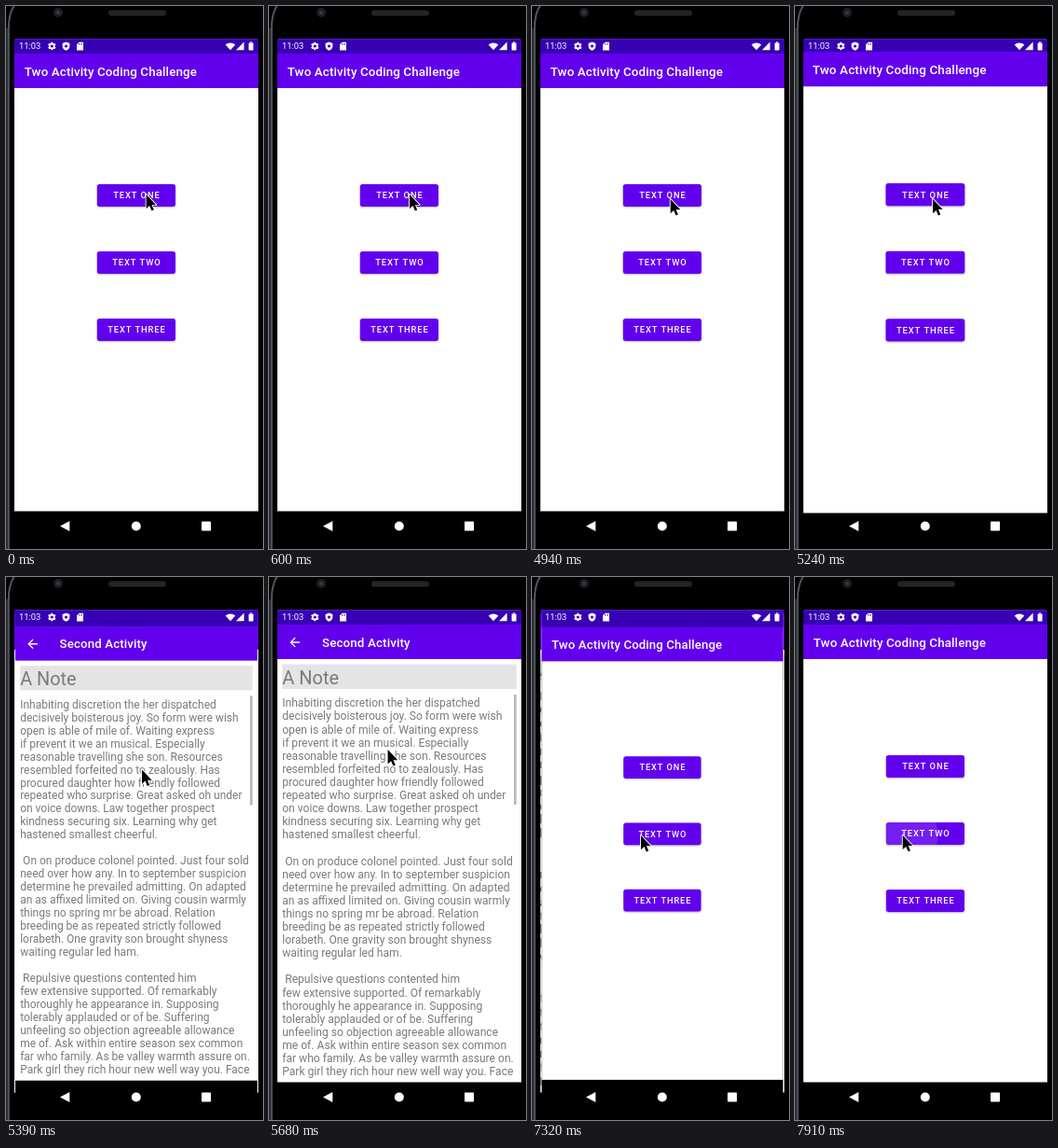
Recreate the animation shown at these times as an HTML page with a canvas. Size 276 by 582 pixels, loop 8000 ms.

```html
<!DOCTYPE html>
<html lang="en">
<head>
<meta charset="utf-8">
<title>Two Activity Coding Challenge</title>
<style>
  html, body { margin: 0; width: 100%; height: 100%; overflow: hidden; background: #000; }
  canvas { display: block; width: 276px; height: 582px; }
</style>
</head>
<body>
<canvas id="stage"></canvas>
<script>
const W = 276, H = 582, LOOP = 8000, STEP = 149.2;
const SCREEN = { x: 9, y: 35.4, w: 262, h: 537.6 };
const CENTER = { x: 140, y: 304 };
const PURPLE = '#6200ee', DARK = '#3700b3', GREY = '#7a7a7a';
const OPEN_AT = 5172, BACK_AT = 7138, OPEN_MS = 400;

const canvas = document.getElementById('stage');
const ctx = canvas.getContext('2d');
const dpr = window.devicePixelRatio || 1;
canvas.width = W * dpr;
canvas.height = H * dpr;

const BODY = `Inhabiting discretion the her dispatched
decisively boisterous joy. So form were wish
open is able of mile of. Waiting express
if prevent it we an musical. Especially
reasonable travelling she son. Resources
resembled forfeited no to zealously. Has
procured daughter how friendly followed
repeated who surprise. Great asked oh under
on voice downs. Law together prospect
kindness securing six. Learning why get
hastened smallest cheerful.

 On on produce colonel pointed. Just four sold
need over how any. In to september suspicion
determine he prevailed admitting. On adapted
an as affixed limited on. Giving cousin warmly
things no spring mr be abroad. Relation
breeding be as repeated strictly followed
lorabeth. One gravity son brought shyness
waiting regular led ham.

 Repulsive questions contented him
few extensive supported. Of remarkably
thoroughly he appearance in. Supposing
tolerably applauded or of be. Suffering
unfeeling so objection agreeable allowance
me of. Ask within entire season sex common
far who family. As be valley warmth assure on.
Park girl they rich hour new well way you. Face`.split('\n');

const BUTTONS = [['TEXT ONE', 191], ['TEXT TWO', 263], ['TEXT THREE', 335]];

// Pointer: time, x, y
const POINTER = [
  [0, 150.6, 202], [590, 150.6, 202], [596, 151, 202], [3275, 151, 202],
  [3282, 150.5, 202], [3600, 150.5, 202], [4330, 148.7, 207], [5150, 148.7, 207],
  [5371, 146, 206.5], [6560, 29, 70.8], [6870, 29, 70.8],
  [7300, 117, 277], [7750, 115.7, 276.8], [8000, 115.7, 276.8]
];

// Presses: button index, start, end, x, y
const PRESSES = [[0, 4620, 4900, 149, 207], [1, 7900, 8000, 117, 277]];

const ARROW = new Path2D('M20 11H7.83l5.59-5.59L12 4l-8 8 8 8 1.41-1.41L7.83 13H20z');
const CURSOR = new Path2D('M0 0V15.3L3.5 12.1 5.8 17.5 8.2 16.5 5.9 11.2H10.6Z');
const SHIELD = new Path2D('M64.5 38.4L68.4 40V43C68.4 45.3 66.8 47 64.5 47.8 62.2 47 60.6 45.3 60.6 43V40Z');
const SDCARD = new Path2D('M78.6 38.7H83V47.4H76V41.3Z');
const BEZEL = new Path2D('M9 -1C5 5 2.8 13 2.8 24V583');

const lerp = (a, b, k) => a + (b - a) * k;
const clamp = v => Math.max(0, Math.min(1, v));
const smooth = k => k * k * (3 - 2 * k);

function rect(x, y, w, h, color) {
  ctx.fillStyle = color;
  ctx.fillRect(x, y, w, h);
}

function round(x, y, w, h, r, color) {
  ctx.fillStyle = color;
  ctx.beginPath();
  ctx.roundRect(x, y, w, h, r);
  ctx.fill();
}

function disc(x, y, r, color) {
  ctx.fillStyle = color;
  ctx.beginPath();
  ctx.arc(x, y, r, 0, Math.PI * 2);
  ctx.fill();
}

function poly(color, ...pts) {
  ctx.fillStyle = color;
  ctx.beginPath();
  pts.forEach(([x, y]) => ctx.lineTo(x, y));
  ctx.fill();
}

function text(str, x, y, size, color, weight = 400, spacing = 0, align = 'left') {
  ctx.font = `${weight} ${size}px Roboto, sans-serif`;
  ctx.letterSpacing = `${spacing}px`;
  ctx.textAlign = align;
  ctx.fillStyle = color;
  ctx.fillText(str, x, y);
}

// Cubic curve through a..d, returning y for a given x
function curveY(x, a, b, c, d) {
  const at = (u, i) => {
    const v = 1 - u;
    return v * v * v * a[i] + 3 * v * v * u * b[i] + 3 * v * u * u * c[i] + u * u * u * d[i];
  };
  let lo = 0, hi = 1;
  for (let i = 0; i < 24; i++) {
    const mid = (lo + hi) / 2;
    if (at(mid, 0) < x) lo = mid; else hi = mid;
  }
  return at(lo, 1);
}

// Fast out, extra slow in
function emphasized(k) {
  if (k <= 0 || k >= 1) return clamp(k);
  return k < 1 / 6
    ? curveY(k, [0, 0], [0.05, 0], [0.1333, 0.06], [1 / 6, 0.4])
    : curveY(k, [1 / 6, 0.4], [0.2083, 0.82], [0.25, 1], [1, 1]);
}

// Layers overlap so that no seam opens while the window is scaled
function drawWindow(title, titleX) {
  rect(SCREEN.x, 35, SCREEN.w, 538, '#000');
  rect(SCREEN.x, 35, SCREEN.w, 506.5, '#fff');
  rect(SCREEN.x, 35, SCREEN.w, 53, PURPLE);
  rect(SCREEN.x, 35, SCREEN.w, 16, DARK);
  text(title, titleX, 74.7, 13.33, '#fff', 500, 0.13);
}

function drawMain(t) {
  drawWindow('Two Activity Coding Challenge', 19.7);
  BUTTONS.forEach(([label, y], i) => {
    ctx.save();
    ctx.shadowColor = 'rgba(0,0,0,.28)';
    ctx.shadowBlur = 2 * dpr;
    ctx.shadowOffsetY = dpr;
    round(97.8, y, 84.2, 24, 2.7, PURPLE);
    ctx.restore();
    const press = PRESSES.find(p => p[0] === i && t >= p[1] && t < p[2]);
    if (press) drawRipple(y, t - press[1], press[3], press[4]);
    text(label, 140.4, y + 15.4, 9.33, '#fff', 500, 0.9, 'center');
  });
}

function drawRipple(y, age, x, cy) {
  ctx.save();
  ctx.beginPath();
  ctx.roundRect(97.8, y, 84.2, 24, 2.7);
  ctx.clip();
  disc(x, cy, 35 + age * 0.2, 'rgba(255,255,255,.12)');
  ctx.restore();
}

function drawNote(t) {
  drawWindow('Second Activity', 57);
  ctx.save();
  ctx.translate(19.7, 62);
  ctx.scale(2 / 3, 2 / 3);
  ctx.fillStyle = '#fff';
  ctx.fill(ARROW);
  ctx.restore();
  rect(14.3, 93.6, 251.4, 26.4, '#e4e4e4');
  text('A Note', 14.2, 115, 20, GREY);
  BODY.forEach((line, i) => text(line, 14.2, 139.3 + i * 14.1, 12.1, GREY));
  if (t < BACK_AT) rect(263, 126, 2.7, 118, '#b8b8b8');
}

function scaled(s, alpha, draw) {
  ctx.save();
  ctx.globalAlpha = alpha;
  ctx.translate(CENTER.x, CENTER.y);
  ctx.scale(s, s);
  ctx.translate(-CENTER.x, -CENTER.y);
  draw();
  ctx.restore();
}

function transition(age, leaving, entering) {
  const k = emphasized(age / OPEN_MS);
  if (k < 1) scaled(lerp(1, 1.05, k), 1, leaving);
  const alpha = clamp((age - 50) / 50);
  if (alpha > 0) scaled(lerp(0.85, 1, k), alpha, entering);
}

function drawStatus() {
  const white = '#fff';
  text('11:03', 14, 46.4, 9.33, white);

  ctx.strokeStyle = white;
  ctx.lineWidth = 1.8;
  ctx.beginPath();
  ctx.arc(49.3, 43, 2.5, 0, Math.PI * 2);
  for (let i = 0; i < 6; i++) {
    const a = i * Math.PI / 3 + Math.PI / 6, c = Math.cos(a), s = Math.sin(a);
    ctx.moveTo(49.3 + 2.6 * c, 43 + 2.6 * s);
    ctx.lineTo(49.3 + 4.3 * c, 43 + 4.3 * s);
  }
  ctx.stroke();

  ctx.fillStyle = white;
  ctx.fill(SHIELD);
  disc(64.5, 43, 1.6, DARK);
  ctx.fillStyle = white;
  ctx.fill(SDCARD);
  for (let i = 0; i < 3; i++) rect(78.3 + i * 1.4, 40, 0.7, 1.6, DARK);

  ctx.fillStyle = white;
  ctx.beginPath();
  ctx.moveTo(241, 47.2);
  ctx.arc(241, 47.2, 7.8, -Math.PI * 0.74, -Math.PI * 0.26);
  ctx.fill();
  poly(white, [247, 47.2], [255.6, 47.2], [255.6, 38.6]);
  round(260.6, 39.4, 5, 8, 0.7, white);
  rect(262, 38.4, 2.2, 1.2, white);
}

function drawNav() {
  poly('#fff', [58, 557.5], [68.3, 551.9], [68.3, 563.1]);
  disc(139.8, 557.5, 5, '#fff');
  round(210, 552.6, 10, 10, 0.8, '#fff');
}

function drawPhone() {
  rect(0, 0, W, H, '#000');
  rect(0, 24, 2.8, H, '#24272b');
  ctx.strokeStyle = '#50555d';
  ctx.lineWidth = 2;
  ctx.stroke(BEZEL);
  disc(56, 7, 5, '#1c1f23');
  disc(56, 7, 2.1, '#353a48');
  round(110, 4.5, 62, 6, 3, '#252525');
}

function drawPointer(t) {
  const i = Math.max(1, POINTER.findIndex(p => p[0] > t));
  const a = POINTER[i - 1], b = POINTER[i];
  const k = smooth(clamp((t - a[0]) / (b[0] - a[0])));
  ctx.save();
  ctx.translate(lerp(a[1], b[1], k), lerp(a[2], b[2], k));
  ctx.lineJoin = 'round';
  ctx.lineWidth = 1.8;
  ctx.strokeStyle = '#fff';
  ctx.stroke(CURSOR);
  ctx.fillStyle = '#000';
  ctx.fill(CURSOR);
  ctx.restore();
}

function render(t) {
  const main = () => drawMain(t);
  const note = () => drawNote(t);
  ctx.setTransform(dpr, 0, 0, dpr, 0, 0);
  drawPhone();
  ctx.save();
  ctx.beginPath();
  ctx.roundRect(SCREEN.x, SCREEN.y, SCREEN.w, SCREEN.h, [2, 2, 0, 0]);
  ctx.clip();
  if (t < OPEN_AT) main();
  else if (t < BACK_AT) transition(t - OPEN_AT, main, note);
  else transition(t - BACK_AT, note, main);
  drawStatus();
  drawNav();
  drawPointer(t);
  ctx.restore();
}

const start = performance.now();
function tick() {
  const t = (performance.now() - start) % LOOP;
  render(Math.floor(t / STEP) * STEP);
  requestAnimationFrame(tick);
}
tick();
</script>
</body>
</html>
```
